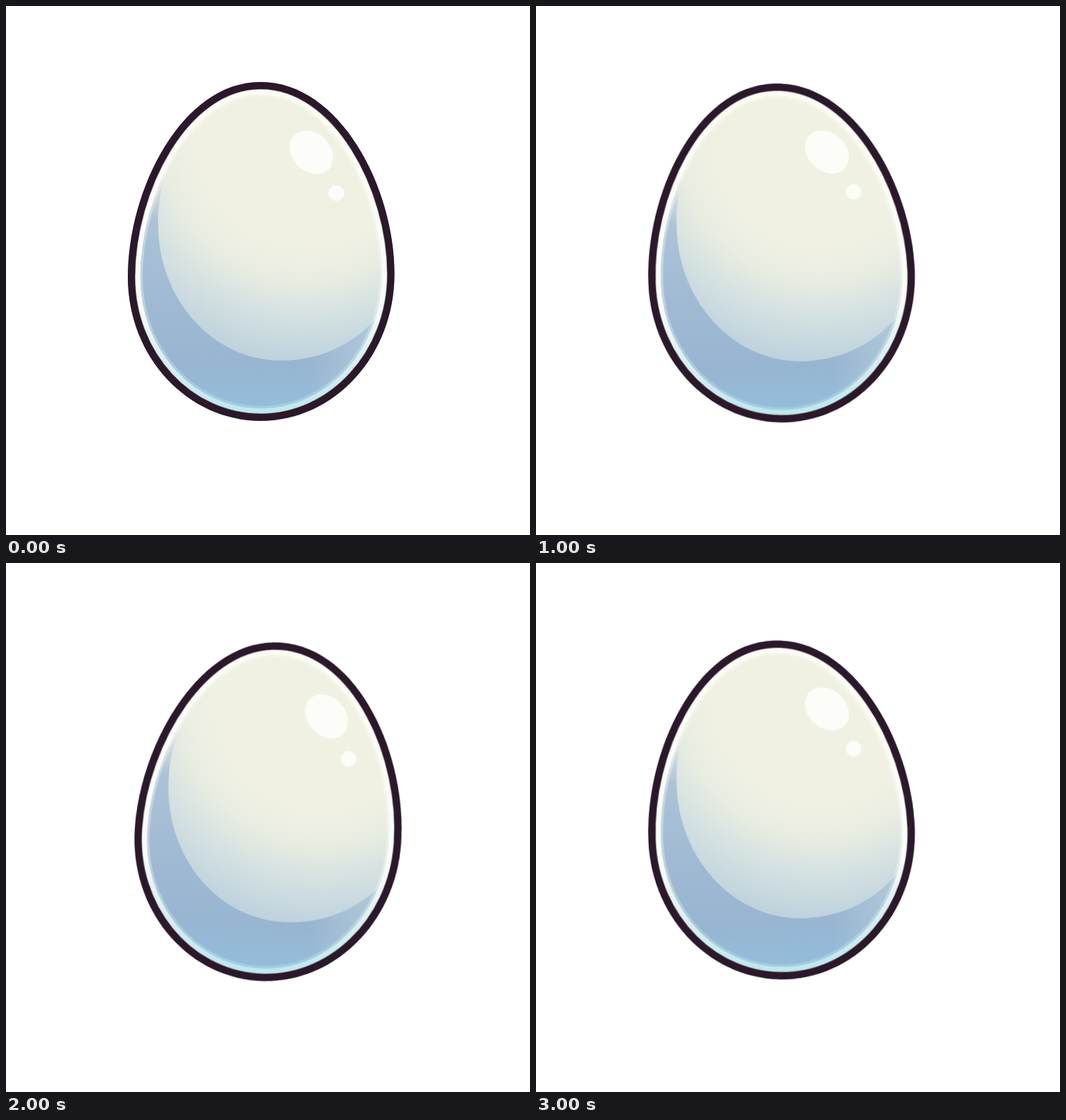
Write an HTML page that moves like this. It is 744 px wide and 752 px high and loops after 8.2 s.

```html
<!DOCTYPE html>
<html lang="en">
<head>
<meta charset="utf-8">
<title>Wobbling egg</title>
<style>
  html, body { margin: 0; width: 100%; height: 100%; overflow: hidden; background: #fff; }
  svg { display: block; width: 100%; height: 100%; }

  .egg { animation: wobble 8200ms step-end infinite; }

  /* Two wobbles in 200 ms steps, then a long rest leaning left. */
  @keyframes wobble {
    0%, 9.756%, 19.5121%, 29.2682% { transform: rotate(0deg); transform-origin: 362px 456px; }
    2.439%, 7.317%, 21.9512%, 26.8292% { transform: rotate(2deg); transform-origin: 319px 456px; }
    4.878%, 24.3902% { transform: rotate(4deg); transform-origin: 301px 524px; }
    12.1951%, 17.0731%, 31.7073%, 36.5853%, 100% { transform: rotate(-2.2deg); transform-origin: 410px 738px; }
    14.6341%, 34.1463% { transform: rotate(-4.1deg); transform-origin: 405px 742px; }
  }
</style>
</head>
<body>
<svg viewBox="0 0 744 752">
  <defs>
    <path id="shell" d="M361.5 108C474 108 551.5 258 551.5 381C551.5 497 466 589.7 361.5 589.7C259 589.7 173 500 173 385C173 262 249 108 361.5 108Z"/>
    <clipPath id="inside"><use href="#shell"/></clipPath>

    <linearGradient id="shade" gradientUnits="userSpaceOnUse" x1="0" y1="215" x2="0" y2="575">
      <stop offset="0" stop-color="#eff0e4"/>
      <stop offset=".12" stop-color="#d8dfe2"/>
      <stop offset=".25" stop-color="#acc3d7"/>
      <stop offset=".6" stop-color="#9fb9d3"/>
      <stop offset=".82" stop-color="#97b5d1"/>
      <stop offset="1" stop-color="#93bedc"/>
    </linearGradient>
    <linearGradient id="shadeEnd" gradientUnits="userSpaceOnUse" x1="430" y1="0" x2="535" y2="0">
      <stop offset="0" stop-color="#bfd2dd" stop-opacity="0"/>
      <stop offset="1" stop-color="#bfd2dd" stop-opacity=".7"/>
    </linearGradient>
    <radialGradient id="light" gradientUnits="userSpaceOnUse" cx="425" cy="190" r="316">
      <stop offset=".48" stop-color="#f0f1e3"/>
      <stop offset=".63" stop-color="#e9ede1"/>
      <stop offset=".8" stop-color="#d4e1e1"/>
      <stop offset="1" stop-color="#bed2dd"/>
    </radialGradient>
    <linearGradient id="rim" gradientUnits="userSpaceOnUse" x1="0" y1="118" x2="0" y2="580">
      <stop offset="0" stop-color="#fcfcf4"/>
      <stop offset=".65" stop-color="#fafcf8"/>
      <stop offset=".85" stop-color="#d6eef2"/>
      <stop offset="1" stop-color="#bce8ee"/>
    </linearGradient>
  </defs>

  <g class="egg">
    <g clip-path="url(#inside)" fill="none">
      <use href="#shell" fill="url(#shade)"/>
      <use href="#shell" fill="url(#shadeEnd)"/>
      <path fill="url(#light)" d="M240 100C240 205 216 250 216 310C216 417 294 504 390 504C450 504 505 478 545 420L570 100Z"/>
      <use href="#shell" stroke="url(#rim)" stroke-width="42" stroke-opacity=".35"/>
      <use href="#shell" stroke="url(#rim)" stroke-width="35"/>
      <use href="#shell" stroke="#8d918f" stroke-width="21.5"/>
      <use href="#shell" stroke="#2b182b" stroke-width="20"/>
    </g>
    <g fill="#fcfcf9">
      <ellipse cx="433.5" cy="208" rx="34.5" ry="27" transform="rotate(45 433.5 208)"/>
      <circle cx="469" cy="266" r="11"/>
    </g>
  </g>
</svg>
</body>
</html>
```
